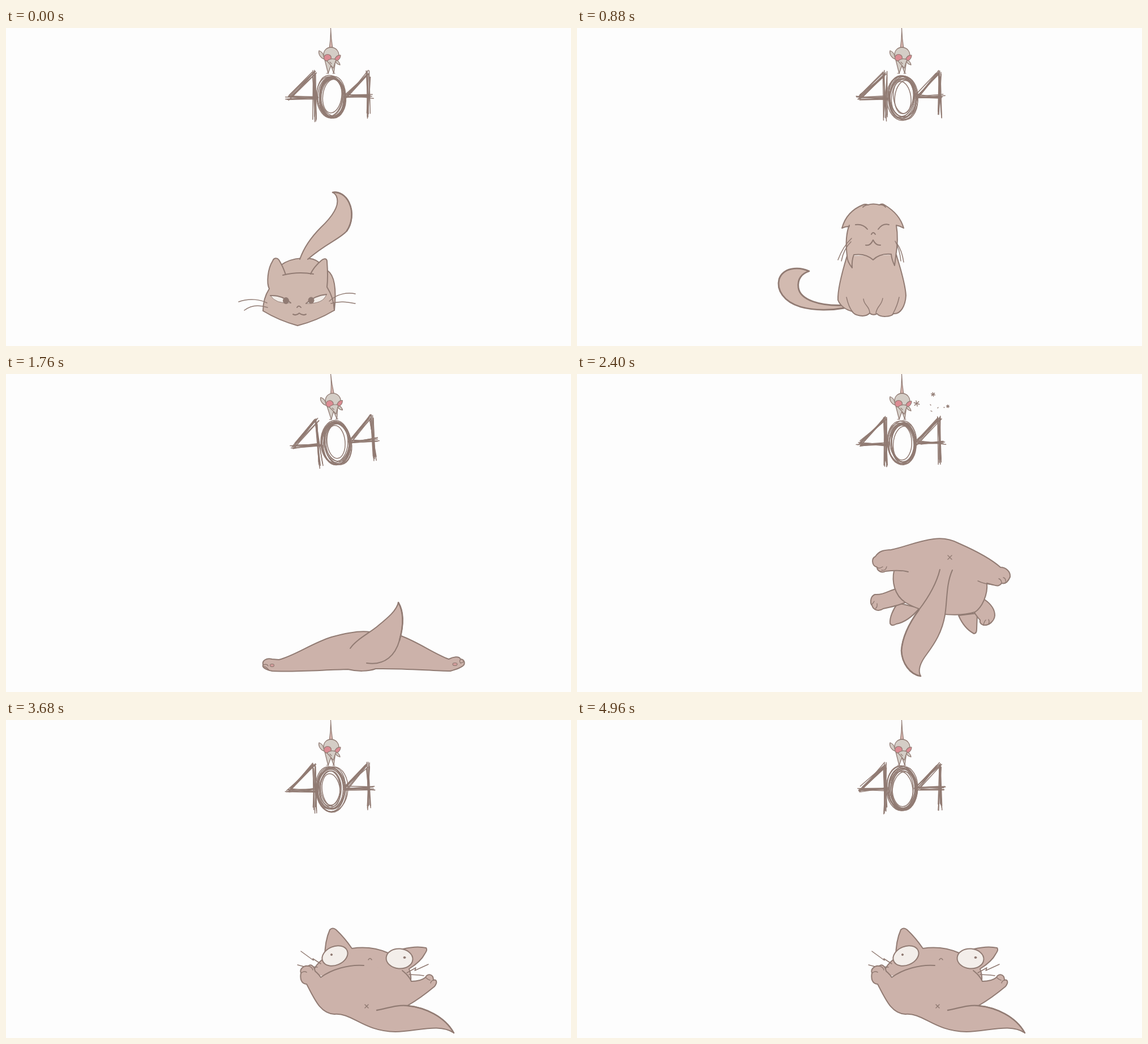
Recreate the animation shown at these times as an HTML page with a canvas. Size 998x561 px, loop 5.04 s.

```html
<!DOCTYPE html>
<html lang="en">
<head>
<meta charset="utf-8">
<title>404</title>
<style>
html, body { margin: 0; width: 100%; height: 100%; overflow: hidden; background: #fdfdfd; }
canvas { display: block; }
</style>
</head>
<body>
<canvas id="stage" width="998" height="561"></canvas>
<script>
const ctx = document.getElementById('stage').getContext('2d');
const LINE = '#917b73', FUR = '#ccb2aa', PALE = '#d2bab0', FACE = '#cfb8ae', EYE = '#f3eeea', PINK = '#dc8b93', GREY = '#d4cdc6';
const STEP = 80, STEPS = 63;
ctx.lineCap = ctx.lineJoin = 'round';

function ink(d, fill, width = 2) {
  const path = new Path2D(d);
  if (fill) { ctx.fillStyle = fill; ctx.fill(path); }
  ctx.strokeStyle = LINE;
  ctx.lineWidth = width;
  ctx.stroke(path);
}

function oval(x, y, rx, ry, tilt, fill, width = 2) {
  const path = new Path2D();
  path.ellipse(x, y, rx, ry, tilt, 0, 7);
  ink(path, fill, width);
}

// Draw around a pivot with rotation, scale and offset.
function place(draw, x, y, { angle = 0, sx = 1, sy = 1, dx = 0, dy = 0 }) {
  ctx.save();
  ctx.translate(x + dx, y + dy);
  ctx.rotate(angle);
  ctx.scale(sx, sy);
  ctx.translate(-x, -y);
  draw();
  ctx.restore();
}

function mix(a, b, t) {
  const number = /-?[\d.]+/g, ends = b.match(number);
  let i = 0;
  return a.replace(number, v => (+v + (ends[i++] - v) * t).toFixed(2));
}

const ease = t => { t = Math.min(1, Math.max(0, t)); return t * t * (3 - 2 * t); };

function randomizer(seed) {
  let s = seed * 7919 + 17;
  return () => {
    s = s + 0x6D2B79F5 | 0;
    let r = Math.imul(s ^ s >>> 15, 1 | s);
    r = r + Math.imul(r ^ r >>> 7, 61 | r) ^ r;
    return ((r ^ r >>> 14) >>> 0) / 4294967296;
  };
}

function sign(n) {
  const random = randomizer(n + 1), jitter = r => (random() * 2 - 1) * r;
  const scribble = (x1, y1, x2, y2, along) => {
    const len = Math.hypot(x2 - x1, y2 - y1), ux = (x2 - x1) / len, uy = (y2 - y1) / len;
    for (let i = 0; i < 8; i++) {
      const a = jitter(along), b = jitter(along), p = jitter(3.8), q = jitter(3.8);
      ink(`M${x1 + ux * a - uy * p} ${y1 + uy * a + ux * p}L${x2 + ux * b - uy * q} ${y2 + uy * b + ux * q}`, null, 1.5);
    }
  };
  scribble(543, 80, 500, 122, 5);
  scribble(498, 123.5, 547, 123.5, 5);
  scribble(544, 81, 545, 159, 7);
  scribble(639, 80, 601, 120, 5);
  scribble(602, 120.5, 646, 120.5, 6);
  scribble(640, 81, 641, 154, 7);
  for (let i = 0; i < 12; i++) {
    const r = i < 8 ? 21 + random() * 6 : 15 + random() * 8;
    oval(575 + jitter(3), 122 + jitter(2.5), r, r * .95 + 14, jitter(.14), null, 1.5);
  }
}

function mouse() {
  ink('M571 36Q574 18 573.5 0Q574 18 577 36', '#d6b3ad', 1.2);
  ink('M562 55C556 53 551 46 553 40Q559 42 561 49', GREY, 1.3);
  ink('M561 50C560 39 567 34 575 34C584 35 590 43 587 52L582 57L579 80L574 66L569 80L563 56Z', GREY, 1.3);
  ink('M583 56Q589 59 590 65Q584 64 582 59', GREY, 1.3);
  oval(568, 52.5, 6.5, 6, 0, PINK, 1.2);
  ink('M580 56Q584 47 591 48Q591 55 584 58Z', PINK, 1.2);
  ink('M567 58Q575 52 583 56L578 71Q574 66 567 58Z', GREY, 1.2);
  ink('M572 60l3 3M566 80l4 0M577 80l4 0', null, 1.2);
}

function sparks(spread) {
  const star = (x, y, r) => {
    for (let i = 0; i < 3; i++) {
      const c = Math.cos(i * 1.05 + .3) * r, s = Math.sin(i * 1.05 + .3) * r;
      ink(`M${x - c} ${y - s}L${x + c} ${y + s}`, null, 1.4);
    }
  };
  place(() => {
    star(600, 52, 5); star(629, 36, 3.5); star(655, 57, 2.5);
    ink('M624 54l1 1M637 60l1 -1M648 59l1 0M625 65l2 1', null, 1.3);
  }, 590, 58, { sx: spread, sy: spread });
}

function crouch(wag) {
  ink('M486 418C505 404 540 402 552 413L568 428C580 436 584 460 580 498L480 498Z', FACE);
  place(() => {
    ink('M519 408C527 385 540 368 556 352C575 334 588 316 585 301C584 295 580 291 577 290C588 288 600 295 606 308C614 325 611 345 602 358C590 372 565 380 533 408', PALE);
    ink('M577 290C588 288 600 295 606 308C614 325 611 345 602 358', null, 2.6);
  }, 526, 408, { angle: wag });
  ink('M494 435C491 426 487 417 482 409C479 405 473 405 471 411C462 425 460 450 465 460C458 471 454 486 454 499Q482 516 515 525Q548 517 580 498Q579 476 567 457C569 440 568 425 567 411C566 405 560 407 556 411C548 418 542 425 538 434', FACE);
  ink('M489 436Q516 429 543 434');
  ink('M467 472Q488 471 503 485Q476 487 467 472', EYE, 1);
  ink('M566 470Q545 472 530 486Q561 487 566 470', EYE, 1);
  ink('M467 472Q488 471 503 485M566 470Q545 472 530 486');
  oval(494.5, 481, 5, 5.5, 0, LINE, 1);
  oval(539, 480.5, 5, 5.5, 0, LINE, 1);
  ink('M514 493Q517 488 521 493M507 505Q513 508 518 503Q524 508 530 505');
  ink('M411 483C430 476 450 479 461 485M421 498C435 487 450 489 462 493M571 482C585 468 605 466 617 469M574 486C590 481 605 484 617 486', null, 1.5);
}

function sit(wag) {
  place(() => ink('M472 489C430 491 394 480 391 458C389 443 397 433 410 429C390 420 364 423 357 443C352 462 365 483 395 492C420 499 450 498 472 494', PALE, 2.8), 468, 492, { angle: wag });
  ink('M477 402C470 425 460 460 461 480C465 490 475 497 486 500C490 507 508 512 517 503Q522 508 530 504C535 511 555 510 559 504C572 505 580 490 581 472C580 450 570 420 564 400', PALE);
  ink('M476 475C479 489 482 495 487 501M506 478C507 490 517 490 517 503M540 477C538 490 530 490 528 503M569 475C566 490 562 497 558 504', null, 1.5);
  ink('M481 350Q474 350 468 353C473 335 485 320 505 312Q509 310 514 312Q523 309 534 312Q539 309 543 312C560 322 572 335 577 353Q570 349 564 348C567 365 566 385 563 403L561 419Q556 409 555 399Q535 397 523 409Q510 397 489 400Q485 410 486 423Q477 412 477 402C475 385 474 365 481 348', PALE);
  ink('M505 316Q509 312 514 312M534 312Q541 311 545 316M492 347Q505 345 513 355M551 347Q540 344 532 355M520 364Q523 358 527 364M510 383Q518 385 523 374Q528 384 536 383');
  ink('M485 371Q470 385 461 409M484 377Q471 390 467 411M562 376Q570 390 572 411M565 380Q574 392 577 413', null, 1.5);
}

function splits(wag) {
  ink('M482 504C510 497 540 475 575 464C600 457 625 452 643 455L698 462C730 474 755 493 782 503C790 499 800 497 803 503C808 503 811 508 809 513C805 518 795 521 785 524C745 523 700 519 653 520C640 525 620 525 604 521C560 522 510 526 470 524C460 522 452 518 454 513C452 506 460 500 470 503Z', FUR);
  oval(470, 514, 3.5, 2.5, 0, '#d39c9b', 1.2);
  oval(793, 512, 4, 2.5, 0, '#d39c9b', 1.2);
  ink('M455 513Q461 511 463 515M803 503Q800 507 803 510Q807 509 809 507M456 516Q460 517 465 523', null, 1.4);
  place(() => {
    ink('M608 484C618 469 640 458 655 446C672 432 690 418 693 403C703 420 702 445 695 470C688 495 670 515 637 510', FUR);
    ink('M693 403C703 420 702 445 695 470', null, 2.6);
  }, 640, 495, { angle: wag });
}

function tumble() {
  ink('M567 404C558 415 552 430 553 440Q556 446 564 441C580 438 595 425 605 413Z', FUR);
  ink('M674 426C680 440 690 452 701 458Q706 458 706 450L707 422Z', FUR);
  ink('M563 379C550 383 540 390 526 389C517 393 518 405 521 408C524 418 534 419 541 414C555 411 570 408 582 402', FUR);
  ink('M720 398C730 405 738 415 738 426C737 436 728 444 718 443C712 441 711 438 712 434Q708 430 702 421', FUR);
  ink('M585 349Q570 345 545 348C538 352 530 347 530 341C520 338 520 325 527 322C535 310 545 311 555 310C580 305 600 295 630 291C645 289 660 291 675 299C700 310 730 325 748 341C757 341 766 348 765 358C762 365 757 371 750 369C745 376 740 373 735 372L724 369C726 390 715 412 703 420C670 430 615 424 580 403C560 390 556 365 560 347', FUR);
  ink('M708 365Q718 370 735 372M529 340Q533 345 540 340M538 346Q545 348 547 340M750 369Q750 363 745 361M757 366Q758 361 753 359M520 407Q523 405 525 401M527 414Q531 411 530 405M718 443Q719 437 722 434M727 441Q729 437 727 433', null, 1.4);
  ink('M655 320l7 7M662 320l-7 7', null, 1.4);
  ink('M641 345C635 370 620 395 604 416C590 435 575 460 573 488C574 510 588 530 607 533C601 522 608 507 618 494C632 475 645 455 650 425C654 400 652 370 663 346', FUR);
  ink('M604 416C590 435 575 460 573 488C574 510 588 530 607 533', null, 2.6);
}

const flat = {
  head: 'M529 465Q535 447 558 432Q559 405 569 382Q574 378 580 384Q595 395 608 415Q642 409 678 419L699 417Q725 409 743 412Q747 416 742 423Q735 437 713 452Q718 462 718 473',
  body: 'M640 435C610 432 575 440 553 450C535 461 520 470 504 475C495 470 487 472 488 478C483 482 482 488 487 492C488 496 495 495 498 497C520 512 550 517 585 517C615 519 640 552 700 552C735 551 760 541 784 558C783 540 765 515 742 508C750 505 760 501 770 499C778 500 782 495 780 492C784 486 778 480 774 480C765 478 745 484 729 475C715 470 707 460 695 451',
  tail: 'M652 514C680 505 715 498 742 508C765 515 783 540 784 558',
  toes: 'M488 478Q493 479 495 484M486 489Q490 485 495 487M774 481Q770 484 770 488M780 491Q775 487 771 491',
  whiskers: 'M515 418L536 436L534 430L550 440M510 443L528 441L526 446L545 444M750 442L722 455L723 449L711 456M756 468L738 465L740 460L715 462',
  nose: 'M638 434Q641 429 644 434M632 502L639 509M638 502L632 509',
  eyes: '577 426 571 425 694 432 704 430'
};
const raised = {
  head: 'M540 450Q546 430 563 420Q563 390 572 370Q577 365 583 370Q598 384 611 403Q645 398 675 411L701 404Q725 398 742 402Q745 405 740 412Q733 426 712 439Q716 450 715 460',
  body: 'M632 433C605 431 575 440 556 454C552 448 549 446 546 443C544 433 538 430 534 434C526 432 518 440 521 446C519 456 521 465 531 466C545 492 555 518 580 519C612 516 630 549 688 550C725 550 765 534 791 552C775 523 740 507 709 504C725 495 745 480 757 470C763 462 760 457 755 459C755 447 744 447 741 454C735 459 728 461 716 461C712 452 706 447 700 442',
  tail: 'M655 512C673 509 690 502 709 504C740 507 775 523 791 552',
  toes: 'M534 434Q541 436 542 441M522 446Q526 442 531 445M741 454Q745 458 749 459M755 459Q751 460 750 464',
  whiskers: 'M521 408L543 424L542 421L556 430M515 432L530 436L529 434L550 436M746 431L722 442L724 437L708 446M738 451L730 450L731 450L712 449',
  nose: 'M640 423Q643 418 646 423M634 502L640 508M640 502L634 508',
  eyes: '581 416 575 414 695 421 704 419'
};

function dazed(t) {
  const part = name => mix(flat[name], raised[name], t);
  ink(part('head'), FUR);
  ink(part('whiskers'), null, 1.5);
  ink(part('body'), FUR);
  ink(part('tail'), null, 2.4);
  ink(part('toes') + part('nose'), null, 1.5);
  const [lx, ly, lpx, lpy, rx, ry, rpx, rpy] = part('eyes').split(' ').map(Number);
  oval(lx, ly, 23.5, 16.5, -.4, EYE);
  oval(rx, ry, 23.5, 17.5, .08, EYE);
  oval(lpx, lpy, 1.6, 1.6, 0, LINE, 1);
  oval(rpx, rpy, 2, 1.6, 0, LINE, 1);
}

function cat(n) {
  const wag = Math.sin(n * Math.PI / 4);
  if (n < 8) {
    place(() => crouch(wag * .16), 515, 525, { sx: 1 + .015 * wag, sy: 1 - .02 * Math.abs(wag) });
  } else if (n < 9) {
    place(() => crouch(-.3), 515, 525, { sx: 1.05, sy: .88 });
  } else if (n < 18) {
    const sy = n < 11 ? .8 + (n - 9) * .25 : n < 15 ? 1 : 1 - (n - 14) * .09;
    place(() => sit(Math.sin((n - 11) * .8) * .12), 520, 508, { sx: 2 - sy, sy });
  } else if (n < 25) {
    const k = ease((n - 16) / 6), sink = Math.max(0, n - 22) * .12;
    place(() => splits((n - 22) * .05), 640, 524, { sx: .55 + .45 * k, sy: 1.5 - .5 * k - sink, dx: -60 * (1 - k) });
  } else if (n < 29) {
    const k = (n - 25) / 3;
    place(tumble, 645, 412, { sx: .85, sy: -1.1 + .15 * k, dy: 40 - 220 * ease(k) });
  } else if (n < 36) {
    const drop = Math.max(0, n - 32);
    place(tumble, 645, 541, { sy: 1 - drop * .18, dy: n < 30 ? -70 : drop ? 0 : (n - 30) * 4 });
  } else {
    const hit = Math.max(0, 38 - n);
    const t = n < 46 ? ease((n - 39) / 6) : 1 + .04 * Math.sin((n - 46) * Math.PI / 8);
    place(() => dazed(t), 640, 558, { sx: 1 + hit * .06, sy: 1 - hit * .2 });
  }
}

function swing(n) {
  const age = n - 20;
  return age < 0 || age > 9 ? 0 : -.092 * Math.sin(age * Math.PI / 4) * Math.exp(-age * .14);
}

function frame(now) {
  const n = Math.floor(now / STEP) % STEPS;
  ctx.fillStyle = '#fdfdfd';
  ctx.fillRect(0, 0, 998, 561);
  place(() => { sign(n); mouse(); }, 573, 0, { angle: swing(n) });
  if (n > 28 && n < 33) sparks([.6, 1, 1.15, 1.25][n - 29]);
  cat(n);
  requestAnimationFrame(frame);
}
requestAnimationFrame(frame);
</script>
</body>
</html>
```
